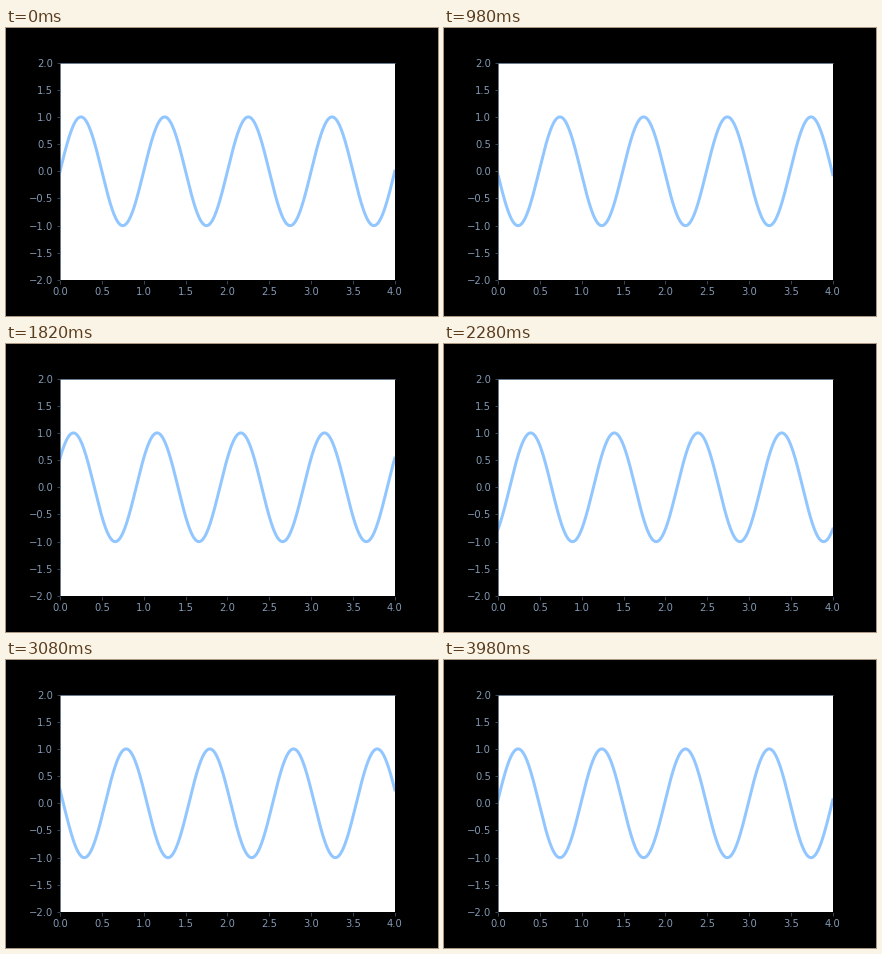
A matplotlib script for the animation above (4000 ms loop, 432x288 px).

```python
import numpy as np
import matplotlib.pyplot as plt
from matplotlib.animation import FuncAnimation

FRAMES, INTERVAL = 200, 20
WAVE, INK, EDGE = "#92C6FF", "#8299b3", "#42596f"

plt.rcParams.update({
    "font.family": "DejaVu Sans",
    "font.size": 10,
    "savefig.facecolor": "black",
    "savefig.dpi": 72,
})

fig = plt.figure(figsize=(6, 4), dpi=72, facecolor="black")
fig.subplots_adjust(left=0.125, right=0.9, bottom=0.125, top=0.88)
ax = fig.add_subplot(xlim=(0, 4), ylim=(-2, 2), facecolor="white")
ax.set_xticks(np.arange(0, 4.1, 0.5))
ax.set_yticks(np.arange(-2, 2.1, 0.5))
ax.tick_params(color=EDGE, labelcolor=INK, width=0.8, length=3.5)
for side, spine in ax.spines.items():
    spine.set_linewidth(0.8)
    spine.set_edgecolor(EDGE if side in ("top", "left") else "black")

x = np.linspace(0, 4, 1000)
line, = ax.plot(x, np.sin(2 * np.pi * x), color=WAVE, lw=3)


def update(i):
    line.set_ydata(np.sin(2 * np.pi * (x - 0.01 * i)))
    return line,


anim = FuncAnimation(fig, update, frames=FRAMES, interval=INTERVAL,
                     repeat=True, repeat_delay=0)
plt.show()
```
